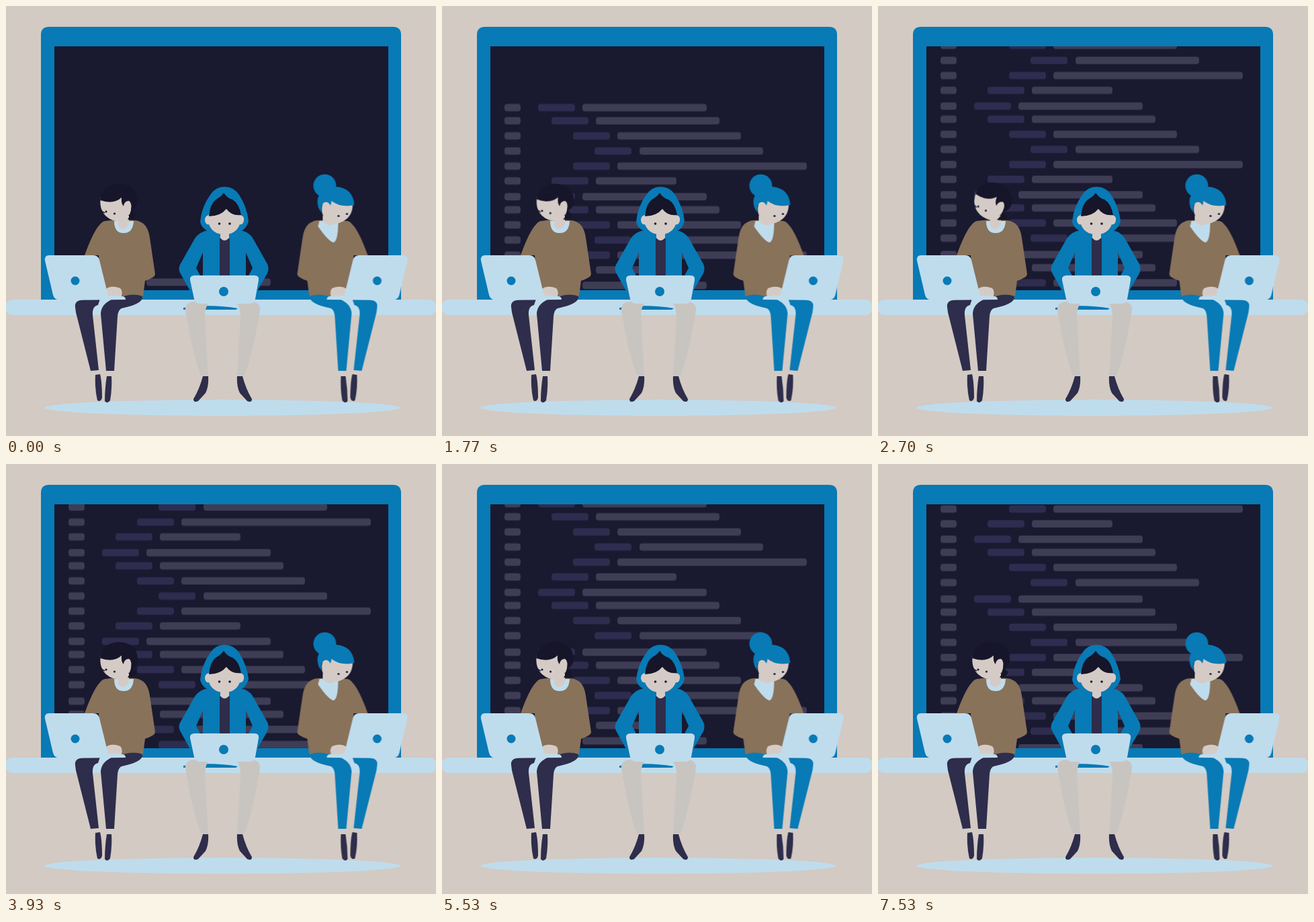
Write an HTML page that moves like this. It is 640 by 640 pixels and loops after 8000 ms.

```html
<!DOCTYPE html>
<html lang="en">
<head>
<meta charset="utf-8">
<title>Coders on a bench</title>
<style>
  html, body { margin: 0; width: 100%; height: 100%; overflow: hidden; background: #d3cac3; }
  svg { display: block; width: 100vw; height: 100vh; }
  .blue { fill: #087ab5; }
  .light { fill: #bfdced; }
  .skin { fill: #d5cbc6; }
  .brown { fill: #88725a; }
  .navy { fill: #2e2d4b; }
  .ink { fill: #191930; }
  .hair { fill: #161529; }
  .bar { fill: #3f3d56; }
  .tag { fill: #2e2d4f; }
  .legs { fill: var(--legs); }
  #head { transform-origin: 178px 303px; }
</style>
</head>
<body>
<svg viewBox="0 0 640 640">
  <defs>
    <clipPath id="screen"><path d="M72 60H569V423H72Z"/></clipPath>

    <g id="sitter">
      <path class="legs" d="M103 448C102 437 112 436 140 436L137 445Q128 447 129 460L138 542L126 543L104 456Z"/>
      <path class="legs" d="M141 458C142 442 155 436 180 429L199 430Q205 432 202 437C198 443 186 447 172 450Q167 452 166 462L161 543L149 543Z"/>
      <path class="navy" d="M133 549L140 548Q143 560 143 583Q141 590 136 587Q132 570 133 549Z"/>
      <path class="navy" d="M150 551L157 551Q158 570 155 587Q151 593 147 588Q147 570 150 551Z"/>
      <path class="brown" d="M148 320Q165 317 192 319Q211 321 214 345L222 399Q222 404 207 409L204 432Q190 427 175 432L140 425L138 371L117 371Q130 335 140 325Q144 320 148 320Z"/>
      <path class="skin" d="M149 421Q157 415 170 420Q174 424 172 432H150Z"/>
      <path class="light" d="M64 371H130Q137 371 139 378L152 431L174 432Q178 433 178 437L82 438Q72 438 70 430L58 379Q57 371 64 371Z"/>
      <circle class="blue" cx="103" cy="409" r="6.500"/>
    </g>

    <g id="face">
      <path class="skin" d="M141 284Q138 303 149 313Q158 321 172 321L184 310Q190 298 182 283Q160 275 141 284Z"/>
      <circle class="ink" cx="149" cy="306" r="1.6"/>
      <circle class="ink" cx="161.5" cy="309" r="1.6"/>
    </g>

    <g id="limb">
      <path fill="#c8c5c1" d="M267 453Q266 441 280 440L301 443Q296 450 296 462L301 550L290 550Q278 520 267 453Z"/>
      <path class="navy" d="M293 551L301 551Q302 566 297 576L286 588Q279 591 279 585Q288 570 293 551Z"/>
    </g>
  </defs>

  <rect width="640" height="640" fill="#d3cac3"/>
  <ellipse class="light" cx="322" cy="598" rx="265" ry="12"/>
  <path class="blue" d="M52 438V43Q52 31 64 31H576Q588 31 588 43V438Z"/>
  <path class="ink" d="M72 60H569V423H72Z"/>
  <g clip-path="url(#screen)"><g id="code"></g></g>
  <rect class="light" y="437" width="640" height="23" rx="9"/>

  <!-- left -->
  <use href="#sitter" style="--legs:#2e2d4b"/>
  <path class="light" d="M161 320Q161 338 175 338Q189 338 190 320Z"/>
  <path class="skin" d="M167 312H183V325Q176 337 167 328Z"/>
  <g id="head">
    <use href="#face"/>
    <path d="M140 299Q140 305 147 308" fill="none" stroke="#191930" stroke-width="1.5"/>
    <path class="hair" d="M140 289Q143 266 168 265Q195 266 196 290Q196 299 188 304L194 310Q190 318 181 318Q186 310 186 304Q189 294 183 290Q176 290 175 298Q171 294 172 285Q160 296 140 289Z"/>
  </g>

  <!-- right -->
  <g transform="translate(655.5) scale(-1 1)">
    <use href="#sitter" style="--legs:#087ab5"/>
    <path class="light" d="M161 320Q161 350 168 352Q176 350 191 328L189 320Z"/>
    <path class="skin" d="M167 312H184V320Q176 329 167 325Z"/>
    <use href="#face" transform="translate(-1 3.5)"/>
    <circle class="blue" cx="181" cy="267.500" r="17"/>
    <path class="blue" d="M137 296Q139 271 164 269Q190 271 192 290Q192 301 186 307Q188 295 181 292Q175 291 173 297Q171 294 171 290Q157 301 137 296Z"/>
  </g>

  <!-- middle -->
  <path class="blue" d="M264 449Q304 443 345 450L342 452H264Z"/>
  <use href="#limb"/>
  <use href="#limb" transform="translate(645) scale(-1 1)"/>
  <path class="blue" fill-rule="evenodd" d="M300 334Q288 336 281 346L259 385Q256 391 259 397L274 424H374L389 398Q392 391 389 384L367 345Q360 335 348 334ZM293 367V401H289L283 390ZM357 367V401H361L367 390Z"/>
  <path class="navy" d="M318 346H333V402H318Z"/>
  <path class="blue" d="M289 321Q291 299 304 281Q312 269 325 269Q339 269 347 281Q359 300 361 320Q358 334 342 338H308Q291 333 289 321Z"/>
  <path class="skin" d="M319 333H332V345Q325 353 319 345Z"/>
  <path class="skin" d="M302 311Q306 290 325 288Q344 290 348 311Q355 312 354 319Q353 326 348 325Q342 340 325 340Q308 340 302 325Q297 326 296 319Q296 312 302 311Z"/>
  <path class="hair" d="M302 313Q304 293 314 287Q320 284 324 278Q329 286 337 288Q347 294 350 311Q336 313 328 302Q319 313 302 313Z"/>
  <circle class="ink" cx="317.500" cy="324" r="1.800"/>
  <circle class="ink" cx="333" cy="324" r="1.800"/>
  <path class="light" d="M281 401H370Q377 401 376 408L371 436Q369 443 363 443H288Q282 443 280 436L274 408Q273 401 281 401Z"/>
  <circle class="blue" cx="324" cy="425" r="7"/>
</svg>
<script>
  const LOOP = 8000;
  const code = document.getElementById('code');

  // offset from the block top, tag x, bar x, bar end
  const lines = [
    [0, 143, 209, 394], [19.5, 163, 229, 413], [42, 195, 261, 445],
    [64.5, 227, 294, 478], [87, 195, 261, 543], [109, 163, 229, 349]
  ];

  function addBar(kind, x, y, width) {
    const rect = document.createElementNS('http://www.w3.org/2000/svg', 'rect');
    const box = { class: kind, x, y: y - 5.5, width, height: 11, rx: 4 };
    for (const key in box) rect.setAttribute(key, box[key]);
    code.append(rect);
  }

  function addBlock(top, count) {
    for (const [dy, tag, start, end] of lines.slice(0, count)) {
      addBar('bar', 93, top + dy, 24);
      addBar('tag', tag, top + dy, 55);
      addBar('bar', start, top + dy, end - start);
    }
  }

  addBlock(0, 6);
  for (let k = 0; k < 5; k++) {
    addBlock(132.5 + 221 * k, 6);
    addBlock(264.5 + 221 * k, 4);
  }

  // steps: [ms, value, easing towards the next step]
  function play(id, steps, toTransform) {
    const frames = steps.map(([ms, value, easing = 'linear']) =>
      ({ offset: ms / LOOP, transform: toTransform(value), easing }));
    document.getElementById(id).animate(frames, { duration: LOOP, iterations: Infinity });
  }

  const glide = 'cubic-bezier(.23, 0, .73, 1)';
  play('code', [
    [0, 411, glide], [3030, -0.5], [5221, -0.5, glide], [6900, -594.5], [LOOP, -594.5]
  ], y => `translateY(${y}px)`);
  play('head', [
    [0, 0], [1700, 0, 'ease-in-out'], [1960, 15], [3650, 15, 'ease-in-out'], [3930, 0], [LOOP, 0]
  ], angle => `rotate(${angle}deg)`);
</script>
</body>
</html>
```
